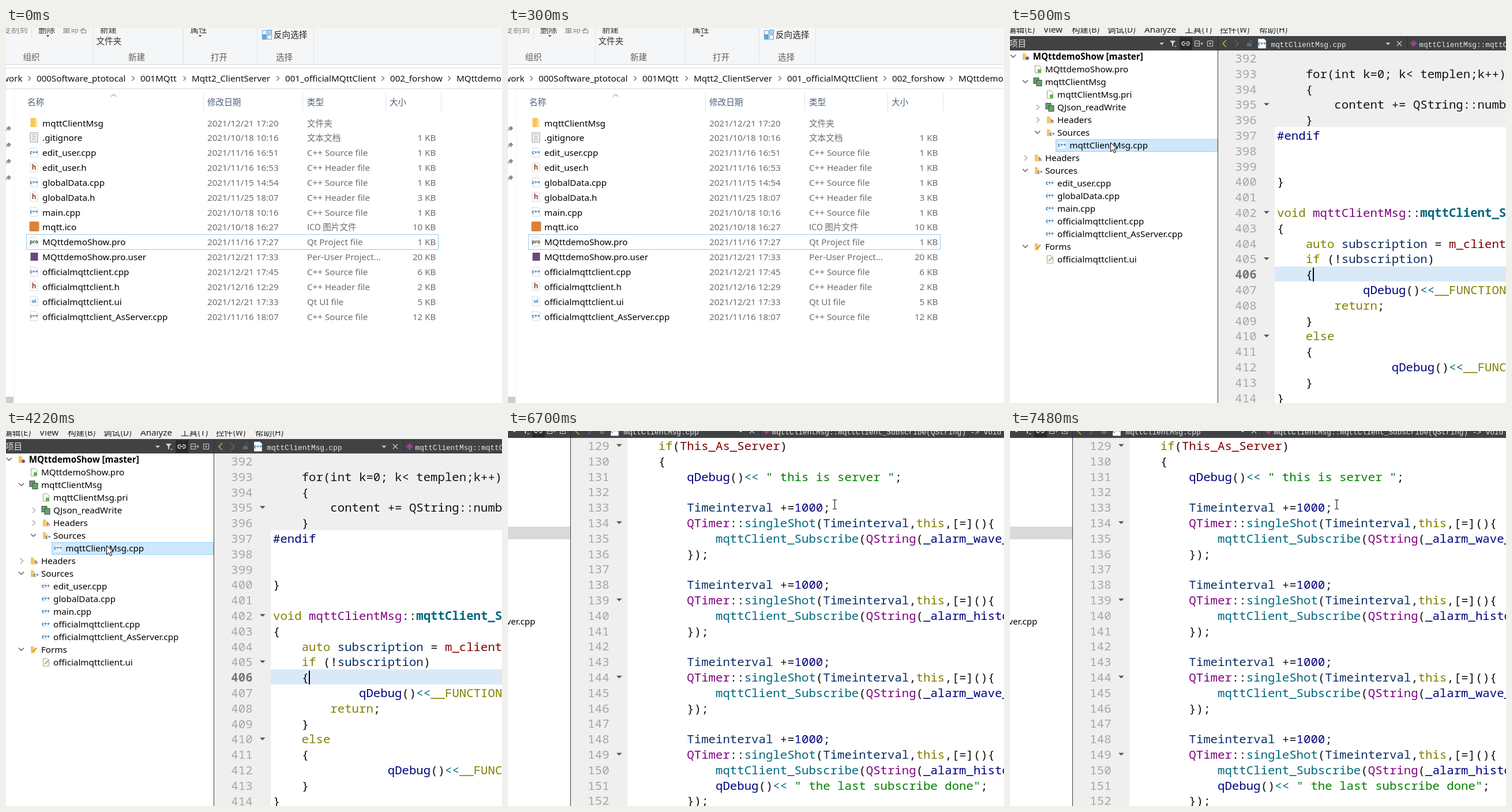
Animation, 860 px wide and 651 px high, one loop 8000 ms. Source, as an HTML page:

```html
<!DOCTYPE html>
<html lang="zh">
<head>
<meta charset="utf-8">
<title>Project walkthrough</title>
<style>
html, body { margin: 0; width: 100%; height: 100%; overflow: hidden; background: #fff; }
svg { display: block; width: 860px; height: 651px; }
text { white-space: pre; font: 15.2px "Noto Sans", "Noto Sans CJK SC", "Noto Sans CJK", sans-serif; }
.cjk { font-size: 14.6px; font-family: "Noto Sans CJK SC", "Noto Sans CJK", "Noto Sans", sans-serif; }
.code { font: 350 20.7px "Noto Sans Mono", monospace; }
.tab { font: 12.75px "Liberation Mono", monospace; }
.bold { font-weight: 700; }
.tiny { font-size: 8.5px; font-weight: 700; }
.end { text-anchor: end; }
.mid { text-anchor: middle; }
.scene { opacity: 0; animation: 8s step-end infinite; }
#explorer { animation-name: first; }
#project { animation-name: second; }
#server { animation-name: third; }
@keyframes first { 0% { opacity: 1 } 6.25%, 100% { opacity: 0 } }
@keyframes second { 0% { opacity: 0 } 6.25% { opacity: 1 } 83.75%, 100% { opacity: 0 } }
@keyframes third { 0% { opacity: 0 } 83.75%, 100% { opacity: 1 } }
</style>
</head>
<body>
<svg viewBox="0 0 860 651">
  <g id="explorer" class="scene"></g>
  <g id="project" class="scene"></g>
  <g id="server" class="scene"></g>
</svg>
<script>
const esc = s => s.replace(/&/g, '&amp;').replace(/</g, '&lt;');
const rect = (x, y, w, h, fill, more = '') => `<rect x="${x}" y="${y}" width="${w}" height="${h}" fill="${fill}" ${more}/>`;
const path = (d, stroke, width = 1, fill = 'none') => `<path d="${d}" stroke="${stroke}" stroke-width="${width}" fill="${fill}"/>`;
const down = (x, y, r, fill) => path(`M${x - r} ${y - r / 2}h${2 * r}l${-r} ${r}z`, 'none', 0, fill);

// y is the vertical middle of the line
function label(x, y, s, fill = '#000', cls = '') {
  const cjk = /[\u4e00-\u9fff]/.test(s) ? 'cjk' : '';
  return `<text x="${x}" y="${y + 5.4}" fill="${fill}" class="${cjk} ${cls}">${esc(s)}</text>`;
}

const page = (x, y, fill = '#fff') =>
  path(`M${x - 6.5} ${y - 8}h10l3 3v13h-13z`, '#d4d8dc', 1, fill);
const tag = (x, y, s, fill) =>
  `<text x="${x}" y="${y + 2.5}" fill="${fill}" class="tiny mid">${s}</text>`;

const icons = {
  folder: (x, y) => rect(x - 6, y - 8, 9, 16, '#f5c65c') + rect(x + 2, y - 6, 4, 14, '#ffe09a'),
  text: (x, y) => path(`M${x - 6.5} ${y - 8}h13v16h-13z`, '#8c8c8c', 1, '#fff') +
    path([-5, -2, 1, 4].map(d => `M${x - 4} ${y + d + .5}h8`).join(''), '#9a9a9a'),
  cpp: (x, y) => page(x, y) + tag(x, y, 'c++', '#1d6fb0'),
  h: (x, y) => page(x, y) + `<text x="${x}" y="${y + 4}" class="mid bold" style="font-size:11.5px" fill="#92402a">h</text>`,
  ico: (x, y) => rect(x - 8, y - 9, 17, 17, '#dc8238', 'rx="2"'),
  pro: (x, y) => page(x, y) + tag(x, y, 'pro', '#38452f'),
  user: (x, y) => rect(x - 6, y - 7, 13, 14, '#69477f'),
  ui: (x, y) => page(x, y) + tag(x, y, 'ui', '#2877b8')
};

function explorer() {
  const line = '#e2e3e4', grey = '#6d6d6d', head = '#4c607a', ribbon = '#5f5f5f';
  let out = rect(0, 0, 860, 651, '#fff') + rect(0, 0, 860, 63, '#f5f6f7') +
    path('M0 63.5H860M0 69.5H860M0 105.5H860', '#dadbdc') +
    path('M44.5 0V18M151.5 0V62M307.5 0V62M435.5 0V62M533.5 0V62', line) +
    path('M342.5 112V145M514.5 112V145M658.5 112V145M754.5 112V145', line) +
    path('M14.5 106V651', '#f3f3f3') +
    path('M182 119l4.5-4 4.5 4', '#777') +
    rect(0, 640, 13, 11, '#cdcdcd');

  for (const [x, y, s, fill] of [
    [-6, 3, '复制到', '#868686'], [56, 3, '删除', '#333'], [97.5, 3, '重命名', '#868686'],
    [163, 3, '新建', '#333'], [156.5, 22.5, '文件夹', '#333'], [319.5, 3, '属性', '#333'],
    [464, 12, '反向选择', '#222'], [29.5, 51, '组织', ribbon], [212, 51, '新建', ribbon],
    [355, 51, '打开', ribbon], [468, 51, '选择', ribbon],
    [37, 129, '名称', head], [349, 129, '修改日期', head], [522, 129, '类型', head], [665, 129, '大小', head]
  ]) out += label(x, y, s, fill);
  out += down(72.5, 14, 3, '#444') + down(336.5, 14, 3, '#444');
  for (const [x, y, fill] of [[444, 4, '#fff'], [453, 3, '#a9d3f2'], [444, 12, '#5aa9e6'], [453, 12, '#fff']])
    out += rect(x + .5, y + .5, 7, 7, fill, 'stroke="#5b9fd2"');

  out += label(28.5, 88, 'work', '#111', 'end');
  for (const [x, s] of [[53, '000Software_ptotocal'], [233, '001MQtt'], [322, 'Mqtt2_ClientServer'],
    [484, '001_officialMQttClient'], [666, '002_forshow'], [781, 'MQttdemoShow']])
    out += label(x, 88, s, '#111') + path(`M${x - 14.5} 83.5l4 4-4 4`, '#666', 1.2);

  for (const y of [175, 203.5, 232, 260.5])
    out += path(`M-1 ${y + 4}l4-4M1 ${y - 2}l5 5`, '#858b90', 1.5) + path(`M2 ${y - 2}l3-3 4 4-3 3z`, 'none', 0, '#858b90');

  const cpp = 'C++ Source file', header = 'C++ Header file';
  [
    ['folder', 'mqttClientMsg', '12/21 17:20', '文件夹', ''],
    ['text', '.gitignore', '10/18 10:16', '文本文档', 1],
    ['cpp', 'edit_user.cpp', '11/16 16:51', cpp, 1],
    ['h', 'edit_user.h', '11/16 16:53', header, 1],
    ['cpp', 'globalData.cpp', '11/15 14:54', cpp, 1],
    ['h', 'globalData.h', '11/25 18:07', header, 3],
    ['cpp', 'main.cpp', '10/18 10:16', cpp, 1],
    ['ico', 'mqtt.ico', '10/18 16:27', 'ICO 图片文件', 10],
    ['pro', 'MQttdemoShow.pro', '11/16 17:27', 'Qt Project file', 1],
    ['user', 'MQttdemoShow.pro.user', '12/21 17:33', 'Per-User Project...', 20],
    ['cpp', 'officialmqttclient.cpp', '12/21 17:45', cpp, 6],
    ['h', 'officialmqttclient.h', '12/16 12:29', header, 2],
    ['ui', 'officialmqttclient.ui', '12/21 17:33', 'Qt UI file', 5],
    ['cpp', 'officialmqttclient_AsServer.cpp', '11/16 18:07', cpp, 12]
  ].forEach(([icon, name, date, type, size], i) => {
    const y = 165.1 + 25.85 * i;
    out += icons[icon](48.5, Math.round(y - 1)) + label(63.1, y, name) + label(349, y, '2021/' + date, grey) +
      label(522, y, type, grey) + (size && label(745.5, y, size + ' KB', grey, 'end'));
  });
  return out + path('M35.5 358.5H749.5V384.5H35.5z', '#99cbe8');
}

const palette = {
  '#808000': ['void', 'auto', 'if', 'return', 'else', 'this', '__FUNCTION__'],
  '#800080': ['mqttClientMsg', 'QTimer', 'QString'],
  '#00677c': ['mqttClient_Subscribe', 'singleShot', '<<'],
  '#092e64': ['subscription', 'Timeinterval'],
  '#800000': ['m_client', 'This_As_Server'],
  '#000080': ['#endif', 'qDebug', '1000', '_alarm_wave_topic', '_alarm_history_topic']
};
const hue = {};
for (const c in palette) for (const word of palette[c]) hue[word] = c;

function highlight(src) {
  const declares = src.startsWith('void');
  return src.match(/"[^"]*"|#?\w+|<<|\s+|./g).map(t => {
    const fill = t[0] === '"' ? '#008000' : hue[t] || '#111';
    const bold = declares && t === 'mqttClient_Subscribe' ? ' class="bold"' : '';
    return `<tspan fill="${fill}"${bold}>${esc(t)}</tspan>`;
  }).join('');
}

function treeIcon(kind, x, y) {
  const doc = path(`M${x - 4.5} ${y - 6.5}h7l3 3v10h-10z`, '#999', 1, '#fff');
  const folder = rect(x - 5, y - 6, 5, 12, '#f3c661') + rect(x, y - 4, 3, 10, '#ffe3a0');
  switch (kind) {
    case 'cpp': return rect(x - 6, y - 6, 12, 12, '#f4f6f8') + tag(x, y, 'c++', '#1d6fb0');
    case 'pro': return doc + rect(x, y, 6, 6, '#5fb648');
    case 'lib': return rect(x - 7, y - 7, 9, 10, '#62a567', 'stroke="#444"') + rect(x - 2, y - 3, 9, 10, '#62a567', 'stroke="#444"');
    case 'root': return folder + `<circle cx="${x + 3}" cy="${y + 3}" r="3" fill="#7356a5"/>`;
    case 'h': return folder + tag(x + 4, y + 3, 'h', '#92402a');
    case 'src': return folder + tag(x + 4, y + 3, 'c+', '#1d6fb0');
    case 'form': return folder + path(`M${x - 2} ${y + 4}l7-7`, '#c58a20', 2);
    default: return doc + path(`M${x - 2} ${y + 3}l7-7`, '#d5962c', 2);
  }
}

function tree(selection) {
  let out = rect(79.5, 193.5, 280, 21, selection.fill, `stroke="${selection.edge}"`);
  // depth, icon, name, expander: v open, > closed
  [
    [0, 'root', 'MQttdemoShow [master]', 'v'], [1, 'pro', 'MQttdemoShow.pro'],
    [1, 'lib', 'mqttClientMsg', 'v'], [2, 'pro', 'mqttClientMsg.pri'],
    [2, 'lib', 'QJson_readWrite', '>'], [2, 'h', 'Headers', '>'], [2, 'src', 'Sources', 'v'],
    [3, 'cpp', 'mqttClientMsg.cpp'], [1, 'h', 'Headers', '>'], [1, 'src', 'Sources', 'v'],
    [2, 'cpp', 'edit_user.cpp'], [2, 'cpp', 'globalData.cpp'], [2, 'cpp', 'main.cpp'],
    [2, 'cpp', 'officialmqttclient.cpp'], [2, 'cpp', 'officialmqttclient_AsServer.cpp'],
    [1, 'form', 'Forms', 'v'], [2, 'ui', 'officialmqttclient.ui']
  ].forEach(([depth, icon, name, expander], i) => {
    const x = 21 * depth, y = 49.6 + 22 * i;
    out += treeIcon(icon, x + 27, y) + label(x + 39.7 + depth * .2, y, name, '#000', depth ? '' : 'bold');
    if (expander === 'v') out += path(`M${x + 1} ${y - 3}l4.5 4.5 4.5-4.5`, '#444', 1.3);
    if (expander === '>') out += path(`M${x + 4} ${y - 4.5}l4.5 4.5-4.5 4.5`, '#999', 1.3);
  });
  return out;
}

function toolbar() {
  const pale = '#d4d4d4';
  return rect(0, 0, 1120, 14, '#f0f0f0') + rect(0, 14, 1120, 25, '#404244') +
    [[-4, '编辑(E)'], [58, 'View'], [107, '构建(B)'], [169, '调试(D)'], [233, 'Analyze'],
      [303, '工具(T)'], [364, '控件(W)'], [432, '帮助(H)']].map(([x, s]) => label(x, 3, s, '#222')).join('') +
    rect(0, 14, 1120, 1, '#38393b') +
    label(-1, 27, '项目', '#e4e4e4') + down(263, 27.5, 4, pale) +
    path('M277 22h10l-4 5v5l-2-1v-4z', 'none', 0, pale) + down(287, 32, 2, pale) +
    rect(294, 16, 22, 22, '#292a2c') +
    path('M303 24h-2a3 3 0 0 0 0 6h2M306 24h2a3 3 0 0 1 0 6h-2M301 27h7', pale, 1.4) +
    path('M320.5 22.5h8v9h-8zM320 27h9M330 27h5M332.5 24.5v5', pale) +
    path('M342.5 22.5h9v9h-9zM347 25v4M345 27h4', pale) +
    path('M360.5 14V39M689.5 16V38', '#2c2d2f') +
    path('M375 21l-6 6 6 6', '#d2aa3c', 1.5) + path('M390 21l6 6-6 6', '#656769', 1.5) +
    rect(411, 26, 8, 6, '#656769') + path('M415 26v-2a2.5 2.5 0 0 1 5 0', '#656769') +
    icons.cpp(437, 27) +
    `<text x="452.5" y="32.5" fill="#e8e8e8" class="tab">mqttClientMsg.cpp</text>` +
    down(655.5, 27.5, 4, pale) + path('M671 23l8 8M679 23l-8 8', pale, 1.1) +
    path('M700 21l6 6-6 6-6-6z', 'none', 0, '#9b3f91') +
    `<text x="709.5" y="32.5" fill="#e8e8e8" class="tab">mqttClientMsg::mqttClient_Subscribe(QString) -> void</text>`;
}

function ide({ first, source, folds, selection, current, disabled = 0 }) {
  const left = 463, pitch = 26.8, top = 39;
  let out = rect(0, 0, 1120, 690, '#fff') + tree(selection) +
    rect(361, top, 98, 651, '#efefef') + rect(360, top, 1, 651, '#404244');
  if (disabled) out += rect(459, top, 661, Math.floor(disabled * pitch) - 1, '#efefef');
  if (current) out += rect(459, 414, 661, 26, '#d9e9f7');
  source.forEach((src, i) => {
    const n = first + i, y = 52.7 + pitch * i;
    const active = n === current;
    out += `<text x="427.6" y="${y + 7.3}" class="code end ${active ? 'bold' : ''}" fill="${active ? '#777' : '#a6a6a6'}">${n}</text>`;
    if (src) {
      const body = src.trimStart(), x = left + 12.42 * (src.length - body.length);
      out += `<text x="${x}" y="${y + 7.3}" class="code" fill="#111">${i < disabled ? esc(body) : highlight(body)}</text>`;
    }
    if (folds.includes(n)) out += down(444.8, y - .5, 4.8, '#555');
  });
  return out + toolbar();
}

const subscribeBlock = topic => [
  '        Timeinterval +=1000;',
  '        QTimer::singleShot(Timeinterval,this,[=](){',
  `            mqttClient_Subscribe(QString(${topic}));`
];
const close = ['        });', ''];

const project = ide({
  first: 392, current: 406, disabled: 5, folds: [395, 402, 405, 410],
  selection: { fill: '#cce8ff', edge: '#99d1f5' },
  source: [
    '', '    for(int k=0; k< templen;k++)', '    {', '        content += QString::number(k);', '    }',
    '#endif', '', '', '}', '', 'void mqttClientMsg::mqttClient_Subscribe(QString topic)', '{',
    '    auto subscription = m_client->subscribe(topic);', '    if (!subscription)', '    {',
    '            qDebug()<<__FUNCTION__;', '        return;', '    }', '    else', '    {',
    '                qDebug()<<__FUNCTION__;', '    }', '}'
  ]
}) + rect(525, 416, 2, 24, '#000') +
  path('M174.5 199v15.5l3.6-3.4 2.6 5.6 2.6-1.2-2.5-5.5h4.9z', '#000', 1, '#fff');

const server = ide({
  first: 129, folds: [129, 134, 139, 144, 149],
  selection: { fill: '#d9d9d9', edge: '#d9d9d9' },
  source: [
    '    if(This_As_Server)', '    {', '        qDebug()<< " this is server ";', '',
    ...subscribeBlock('_alarm_wave_topic'), ...close,
    ...subscribeBlock('_alarm_history_topic'), ...close,
    ...subscribeBlock('_alarm_wave_topic'), ...close,
    ...subscribeBlock('_alarm_history_topic'),
    '            qDebug()<< " the last subscribe done";', close[0]
  ]
});

const fill = (id, markup) => document.getElementById(id).innerHTML = markup;
fill('explorer', explorer());
fill('project', project);
fill('server', `<g transform="translate(-252 -27)">${server}</g>` +
  path('M563 119.5h2.5l1 1 1-1h2.5M566.5 120V135M563 135.5h2.5l1-1 1 1h2.5', '#222', 1.2));
</script>
</body>
</html>
```
